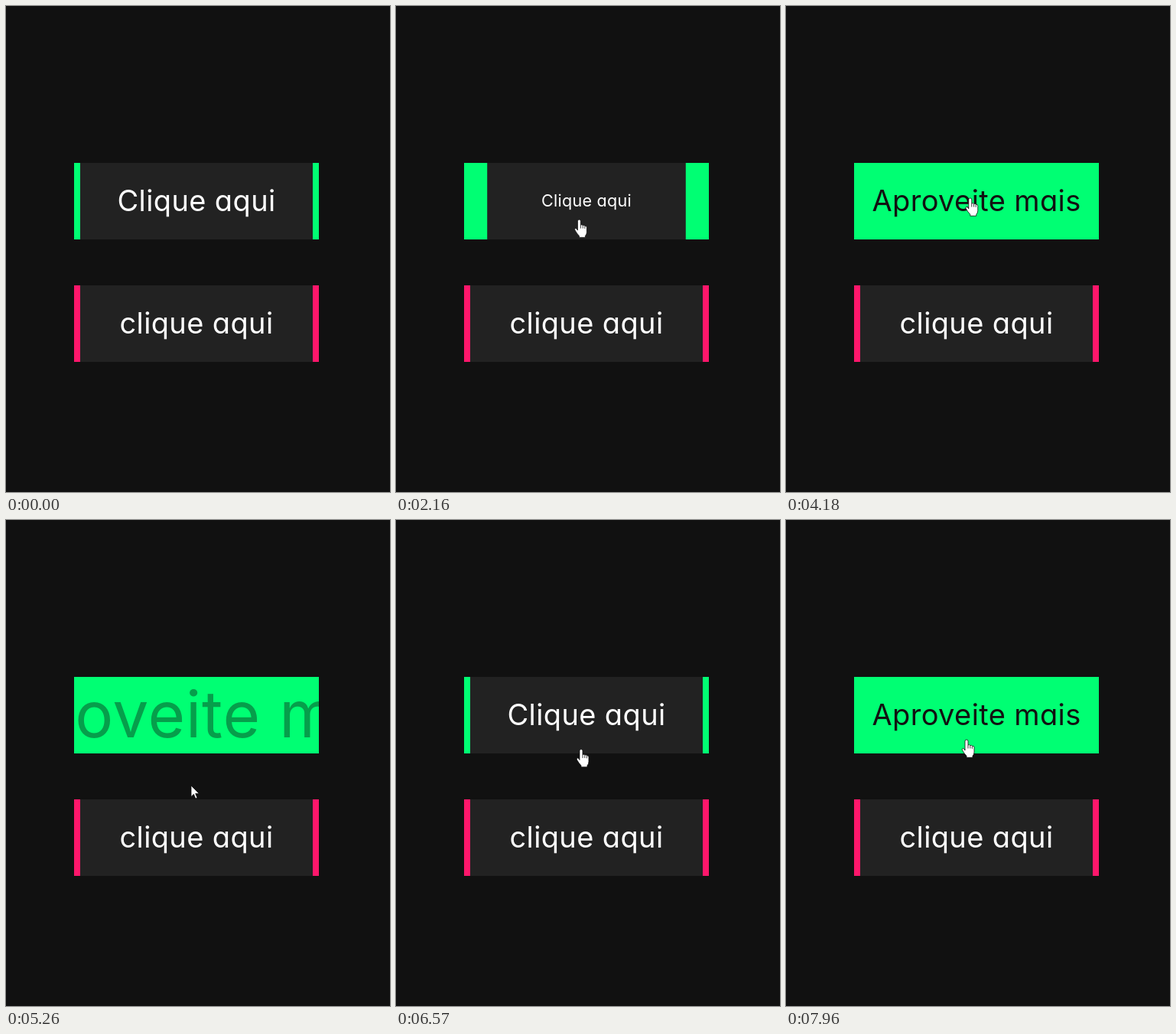
Animation, 502 px wide and 635 px high, one loop 8 s. Source, as an HTML page:

```html
<!DOCTYPE html>
<html lang="pt">
<head>
<meta charset="utf-8">
<title>Botões</title>
<style>
  html, body { margin: 0; width: 100%; height: 100%; overflow: hidden; background: #111; }
  svg { display: block; width: 502px; height: 635px; }
  text {
    font: 430 38px Inter, "Open Sans", sans-serif;
    font-feature-settings: "cv11";
    letter-spacing: .01em;
    text-anchor: middle;
    fill: #fff;
  }
  #offer text { font-weight: 400; fill: #111; }
  .panel { fill: #222; }
  .green { fill: #00ff73; }
  .pink { fill: #ff176b; }
  #cursor path { fill: #fff; stroke: #111; stroke-width: .8; stroke-linejoin: round; }
</style>
</head>
<body>
<svg viewBox="0 0 502 635">
  <clipPath id="frame"><rect x="89" y="205" width="320" height="100"/></clipPath>
  <g clip-path="url(#frame)">
    <rect class="panel" x="89" y="205" width="320" height="100"/>
    <g id="label"><text y="13">Clique aqui</text></g>
    <rect id="left" class="green" x="89" y="205" height="100"/>
    <rect id="right" class="green" y="205" height="100"/>
    <g id="offer"><text y="13">Aproveite mais</text></g>
  </g>

  <rect class="panel" x="89" y="365" width="320" height="100"/>
  <rect class="pink" x="89" y="365" width="8" height="100"/>
  <rect class="pink" x="401" y="365" width="8" height="100"/>
  <text x="249" y="428">clique aqui</text>

  <g id="cursor">
    <path id="arrow" d="M0 0V14.5L3.4 11.3L5.8 17L8 16L5.7 10.4H10.4Z"/>
    <g id="hand">
      <path d="M-2 14V2a2 2 0 0 1 4 0V7q1.5-1 2.8 .6q1.6-.8 2.6 .7q2.6-.4 2.6 2v6q0 3-2 5v2h-8v-2q-3-3-5.5-7.5q-1-2 .8-2.4q1.5-.2 2.7 2.6z"/>
      <path d="M2 7v4.5M4.8 8v3.5M7.4 8.8v3"/>
    </g>
  </g>
</svg>
<script>
const LOOP = 8000;
const ENTER = 2096, LEAVE = 5088, REENTER = 6616;
const $ = id => document.getElementById(id);
const clamp = v => Math.min(1, Math.max(0, v));
const smooth = v => { v = clamp(v); return v * v * (3 - 2 * v); };

// The CSS "ease" curve, cubic-bezier(.25, .1, .25, 1)
function ease(x) {
  x = clamp(x);
  const curve = (s, a, b) => 3 * s * (1 - s) ** 2 * a + 3 * s * s * (1 - s) * b + s ** 3;
  let low = 0, high = 1;
  for (let i = 0; i < 20; i++) {
    const mid = (low + high) / 2;
    if (curve(mid, .25, .25) < x) low = mid; else high = mid;
  }
  return curve(low, .1, 1);
}

// Hover amount from 0 to 1, with separate delays for entering and leaving
function hover(t, duration, enterDelay, leaveDelay) {
  const step = start => ease((t - start) / duration);
  return step(ENTER + enterDelay) - step(LEAVE + leaveDelay) + step(REENTER + enterDelay);
}

function cursorAt(t) {
  let x = 444, y = 642;
  const glide = (dx, dy, start, end) => {
    const k = smooth((t - start) / (end - start));
    x += dx * k;
    y += dy * k;
  };

  // Curve in from below, then cross to the upper button
  glide(-15, -269, 130, 1000);
  x -= 18 * Math.sin(Math.PI * smooth((t - 130) / 870));
  glide(-193, -54, 1000, 1700);
  glide(0, -68, 1960, 2320);
  glide(19, 0, 1960, 2700);

  // Sway from side to side over the button
  glide(-14, 0, 3560, 4180);
  x += 42 * Math.sin(2 * Math.PI * clamp((t - 3560) / 1240));
  glide(0, 26, 4180, 4490);
  glide(34, 0, 4490, 4800);

  // Leave downwards and come back
  glide(-33, 70, 4900, 5260);
  glide(0, -74, 6440, 6660);
  glide(-6, 0, 6570, 7200);
  glide(0, 14, 7800, 7960);
  return [x, y];
}

function setScale(id, scale) {
  $(id).setAttribute("transform", `translate(249 255) scale(${scale})`);
}

function draw(t) {
  const bar = 8 + 152 * hover(t, 500, 0, 500);
  $("left").setAttribute("width", bar);
  $("right").setAttribute("width", bar);
  $("right").setAttribute("x", 409 - bar);

  setScale("label", 1 - hover(t, 250, 0, 500));

  const shown = hover(t, 500, 417, 0);
  setScale("offer", 3 - 2 * shown);
  $("offer").setAttribute("opacity", shown);

  const [x, y] = cursorAt(t);
  const pointing = y < 305;
  $("cursor").setAttribute("transform", `translate(${x} ${y})`);
  $("hand").style.display = pointing ? "" : "none";
  $("arrow").style.display = pointing ? "none" : "";
}

const begin = performance.now();
function tick() {
  draw((performance.now() - begin) % LOOP);
  requestAnimationFrame(tick);
}
tick();
</script>
</body>
</html>
```
